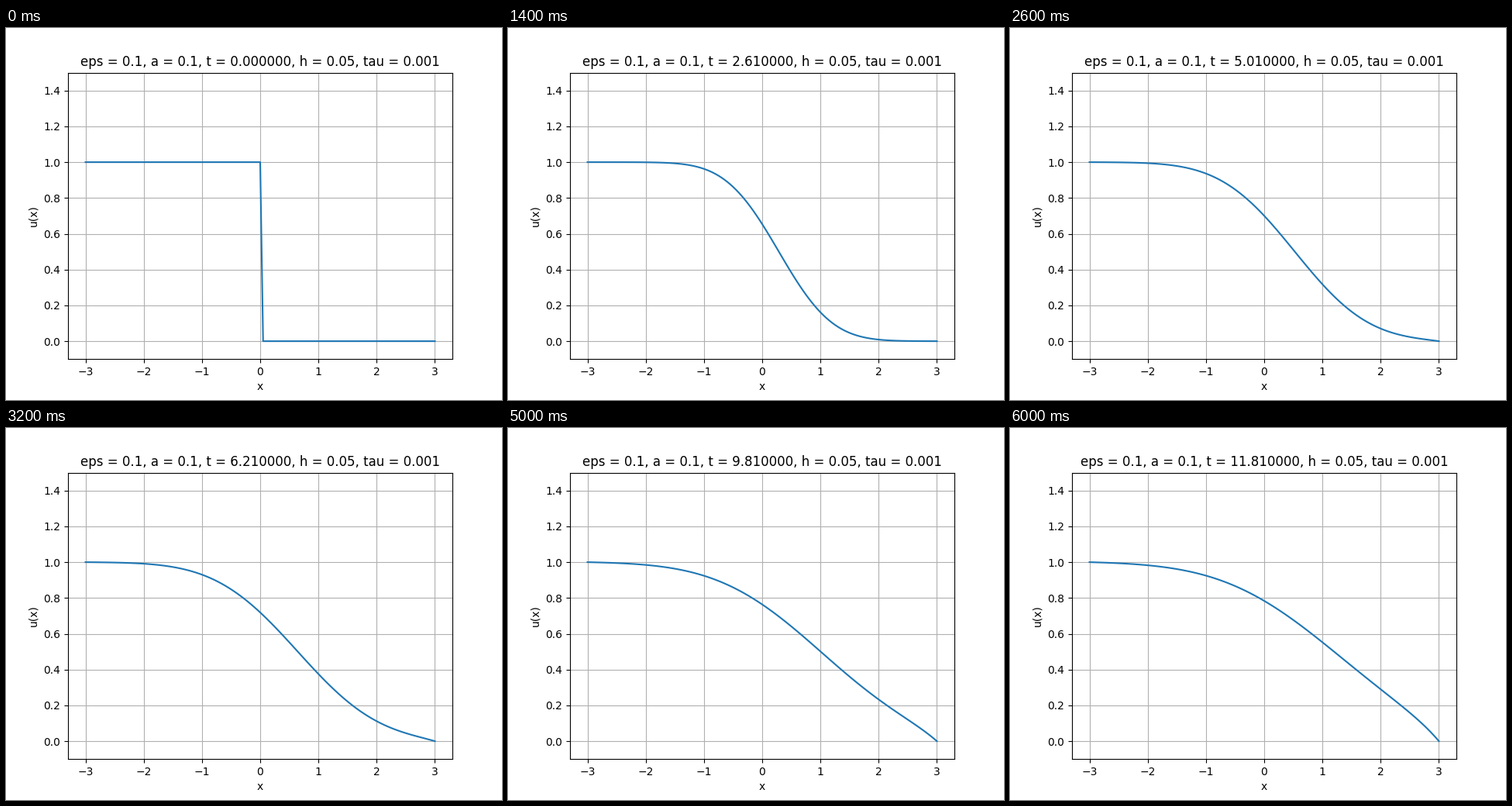
These frames come from a looping animation (640x480 px, 6.1 s). A matplotlib script:

```python
import numpy as np
import matplotlib.pyplot as plt
from matplotlib.animation import FuncAnimation

EPS, A = 0.1, 0.1
H, TAU = 0.05, 0.001
FRAMES = 61
FIRST_STEPS, STEPS = 10, 200  # solver steps before the first / each later frame


def advance(u, steps):
    """Explicit scheme for u_t + a u_x = eps u_xx with fixed end values."""
    diffusion = EPS * TAU / H**2
    drift = A * TAU / (2 * H)
    for _ in range(steps):
        left, mid, right = u[:-2], u[1:-1], u[2:]
        u[1:-1] = mid + diffusion * (left - 2 * mid + right) - drift * (right - left)
    return u


def solve():
    u = np.where(np.arange(x.size) <= x.size // 2, 1.0, 0.0)
    profiles = [u.copy()]
    for k in range(1, FRAMES):
        profiles.append(advance(u, FIRST_STEPS if k == 1 else STEPS).copy())
    return profiles


def time_at(k):
    return 0.0 if k == 0 else TAU * (FIRST_STEPS + STEPS * (k - 1))


def draw(k):
    line.set_ydata(profiles[k])
    title.set_text(f"eps = {EPS}, a = {A}, t = {time_at(k):.6f}, h = {H}, tau = {TAU}")
    return line, title


x = np.linspace(-3, 3, 121)
profiles = solve()

fig, ax = plt.subplots(figsize=(6.4, 4.8), dpi=100)
line, = ax.plot(x, profiles[0])
title = ax.set_title("")
ax.set_xlabel("x")
ax.set_ylabel("u(x)")
ax.set_ylim(-0.1, 1.5)
ax.grid(True)

anim = FuncAnimation(fig, draw, frames=FRAMES, interval=100, repeat=True,
                     repeat_delay=0, blit=False)
plt.show()
```
